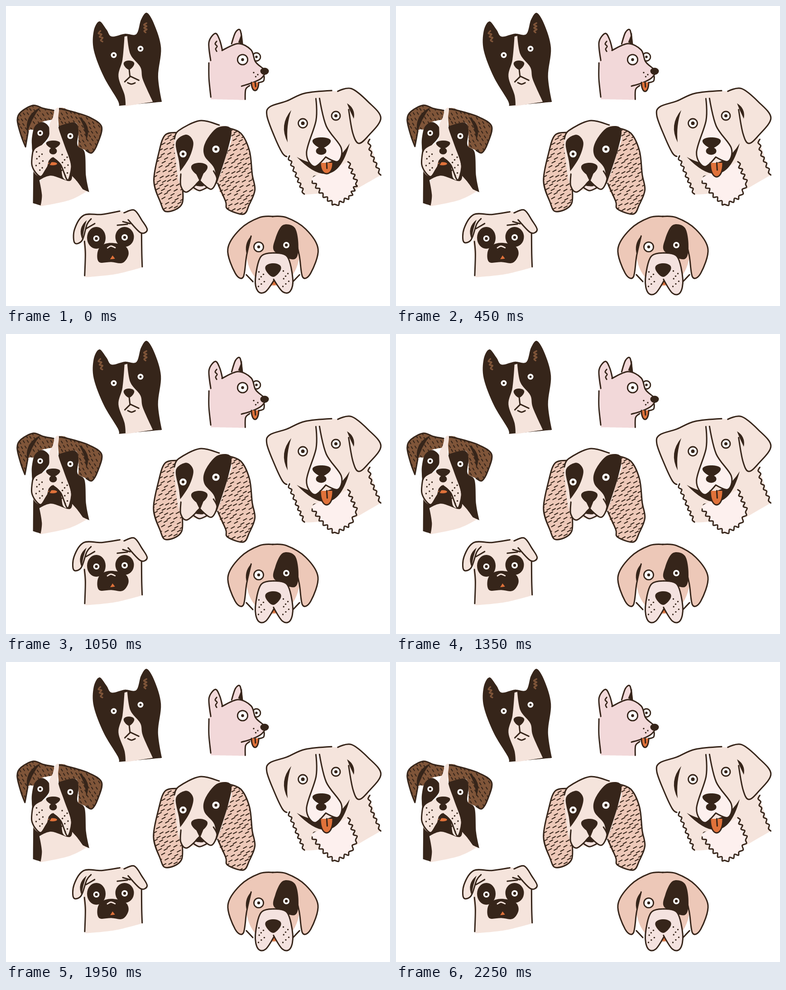
Animation, 848 px wide and 660 px high, one loop 2400 ms. Source, as an HTML page with a canvas:

```html
<!DOCTYPE html>
<html lang="en">
<head>
<meta charset="utf-8">
<title>Dogs</title>
<style>
html, body { margin: 0; width: 100%; height: 100%; overflow: hidden; background: #fff; }
canvas { display: block; width: 848px; height: 660px; }
</style>
</head>
<body>
<canvas id="stage"></canvas>
<script>
const INK = "#36251a", PALE = "#f5e4dc", PINK = "#f2d8d9", PEACH = "#edc8b8",
      BROWN = "#7f5539", ORANGE = "#e0723a", MUZZLE = "#f4e2df", CHEST = "#fdf0ee";
const STEP = 150, ORDER = [0, 1, 2, 1];

const canvas = document.getElementById("stage");
const ctx = canvas.getContext("2d");
const ratio = window.devicePixelRatio || 1;
canvas.width = 848 * ratio;
canvas.height = 660 * ratio;

let pose = 0;
const lift = () => pose - 1;                 // -1, 0, 1: tongues and jowls
const sway = () => pose > 1 ? 1 : lift() * 0.3; // ears mostly move in the last pose
const wobble = (x, y) => 0.35 * Math.sin(x * 12.9 + y * 78.2 + pose * 37);

// "x,y x,y!" where ! marks a sharp corner.
function points(text) {
  return text.split(" ").map(p => {
    const [x, y] = p.replace("!", "").split(",").map(Number);
    return { x: x + wobble(x, y), y: y + wobble(y, x), k: p.endsWith("!") ? 0 : 1 / 6 };
  });
}

function spline(p, closed) {
  const n = p.length, path = new Path2D();
  const get = i => closed ? p[(i + n) % n] : p[Math.max(0, Math.min(n - 1, i))];
  path.moveTo(p[0].x, p[0].y);
  for (let i = 0; i < (closed ? n : n - 1); i++) {
    const a = get(i - 1), b = get(i), c = get(i + 1), d = get(i + 2);
    path.bezierCurveTo(b.x + (c.x - a.x) * b.k, b.y + (c.y - a.y) * b.k,
                       c.x - (d.x - b.x) * c.k, c.y - (d.y - b.y) * c.k, c.x, c.y);
  }
  return path;
}

function stroke(path, width = 3) {
  ctx.lineWidth = width;
  ctx.strokeStyle = INK;
  ctx.stroke(path);
}

function paint(color, path) {
  ctx.fillStyle = color;
  ctx.fill(path);
  return path;
}

const lines = (...texts) => texts.forEach(t => stroke(spline(points(t))));
const blob = (color, text) => paint(color, spline(points(text), true));

// A filled shape whose first points carry an ink line.
function form(color, text, inked) {
  const path = blob(color, text);
  stroke(spline(points(text).slice(0, inked)));
  return path;
}

function oval(color, x, y, rx, ry = rx) {
  const path = new Path2D();
  path.ellipse(x, y, rx, ry, 0, 0, 7);
  return paint(color, path);
}

function eye(x, y, r, pupil = 3.2) {
  stroke(oval("#fff", x, y, r), 2.8);
  oval(INK, x, y, pupil);
}

function nose(x, y, w, h) {
  const path = new Path2D();
  for (let t = 0; t < 6.28; t += 0.2)
    path.lineTo(x + w * Math.cos(t) * (1 - 0.4 * Math.sin(t)), y + h * Math.sin(t));
  paint(INK, path);
}

function tongue(x, y, w, h) {
  const path = new Path2D(), low = y + h * 1.33;
  path.moveTo(x - w, y);
  path.bezierCurveTo(x - w, low, x + w, low, x + w, y);
  stroke(paint(ORANGE, path));
  lines(`${x},${y} ${x + 1},${y + h / 2}`);
}

// Tapered crescent from one point to another.
function wedge(x0, y0, x1, y1, bend, w) {
  const len = Math.hypot(x1 - x0, y1 - y0), nx = (y1 - y0) / len, ny = (x0 - x1) / len;
  const path = new Path2D();
  const mid = k => [(x0 + x1) / 2 + nx * k, (y0 + y1) / 2 + ny * k];
  path.moveTo(x0, y0);
  path.quadraticCurveTo(...mid(2 * bend + w), x1, y1);
  path.quadraticCurveTo(...mid(2 * bend - w), x0, y0);
  paint(INK, path);
}

// Fur edge: teeth of the given size along a rough line.
function ragged(text, teeth, size) {
  const p = points(text), out = [];
  for (let i = 0; i < p.length - 1; i++) {
    const dx = p[i + 1].x - p[i].x, dy = p[i + 1].y - p[i].y, len = Math.hypot(dx, dy);
    const n = Math.round(len / teeth) * 2;
    for (let j = 0; j < n; j++) {
      const side = (j % 2 ? -1 : 1) * size;
      out.push({ x: p[i].x + dx * j / n + dy / len * side,
                 y: p[i].y + dy * j / n - dx / len * side, k: 1 / 6 });
    }
  }
  return spline(out.concat(p[p.length - 1]));
}

function freckles(x, y, w, h, n) {
  for (let i = 0; i < n; i++)
    oval(INK, x + w * (i * 2 % 3 - 1) / 2 + Math.sin(i * 5), y + h * (i / (n - 1) - 0.5), 1.7);
}

function hatch(clip, x0, y0, w, h, gap, len, angle) {
  const marks = new Path2D(), dx = Math.cos(angle) * len / 2, dy = Math.sin(angle) * len / 2;
  for (let row = 0; row * 10 < h; row++)
    for (let col = 0; col * gap < w; col++) {
      const x = x0 + (col + row % 2 / 2) * gap + 2 * Math.sin(row * 7 + col);
      const y = y0 + row * 10 + 2 * Math.sin(col * 5 + row);
      marks.moveTo(x - dx, y - dy);
      marks.lineTo(x + dx, y + dy);
    }
  ctx.save();
  ctx.clip(clip);
  stroke(marks, 2.1);
  ctx.restore();
}

function hinge(x, y, degrees, part) {
  ctx.save();
  ctx.translate(x, y);
  ctx.rotate(degrees * sway() * Math.PI / 180);
  ctx.translate(-x, -y);
  part();
  ctx.restore();
}

function bothSides(axis, part) {
  part();
  ctx.save();
  ctx.translate(2 * axis, 0);
  ctx.scale(-1, 1);
  part();
  ctx.restore();
}

function terrier() {
  blob(INK, "249,220! 246,207 216,156 194,98 194,55 206,34 222,52 233,67 262,61 288,62 298,30 311,15 328,41 342,92 336,155 344,211!");
  blob(PALE, "262,67! 268,66! 275,106 297,135 302,162 324,211! 264,220! 262,195 248,155 257,118");
  for (const text of ["206,56 213,78", "307,38 308,58"]) {
    ctx.lineWidth = 3.4;
    ctx.strokeStyle = BROWN;
    ctx.stroke(ragged(text, 8, 3));
  }
  for (const [x, y] of [[238, 108], [297, 94]]) {
    oval("#fff", x, y, 6.5);
    oval(INK, x, y, 2.5);
  }
  nose(271.5, 130, 11, 10);
  lines("271,132 274,155", "262,167 275,155! 293,163", "269,169 277,172 285,169");
}

function pup() {
  eye(553, 112, 9, 2.8);
  form(PINK, "498,83 507,58 517,53 522,84", 4);
  blob(INK, "513,80! 521,58! 522,84!");
  blob(PINK, "449,120! 452,205! 529,207! 529,184 560,163 572,147 554,127 541,96 513,83 479,97");
  form(PINK, "452,120 448,80 462,60 472,75 478,97", 5);
  stroke(ragged("463,78 465,100", 9, 2), 2.8);
  lines("448,125 448,160 452,200", "477,98 512,83 541,96 551,122 567,137", "528,205 529,184 538,175",
        "570,155 569,165 558,169", "520,176 542,170 562,160 571,151");
  eye(522.5, 118, 11.2);
  tongue(550, 168, 8, 20 + 2 * lift());
  oval(INK, 571, 143.5, 9.5, 7.8);
  freckles(552, 151, 10, 9, 3);
}

function boxer() {
  blob(PALE, "75,380! 110,365 145,370! 182,406! 140,427 75,441!");
  blob(INK, "117,264 150,256 161,272 158,306 174,322 177,375 184,410! 170,403! 157,386 146,374! 139,385 100,373 74,383! 79,415 77,439! 60,434! 60,370! 62,345! 100,320 122,295");
  hinge(82, 224, 2.5, () => {
    const ear = form(BROWN, "105,230 82,225 60,218 33,232 25,250 33,285 42,309! 48,275 60,272! 77,256 103,250!", 8);
    hatch(ear, 20, 218, 90, 95, 10, 5, 1 + 0.2 * sway());
  });
  blob(INK, "58,286 64,265 80,255 95,266 95,286 80,305 61,322 57,305");
  hinge(160, 240, -1, () => {
    const ear = form(BROWN, "118,226 150,233 185,245 211,265 203,301 190,323 177,318 160,310! 160,270 150,256 117,264!", 7);
    hatch(ear, 117, 226, 100, 98, 10, 5, 1 + 0.2 * sway());
  });
  wedge(76, 223, 47, 280, -8, 9);
  wedge(160, 243, 177, 296, 8, 8);
  blob(PALE, "108,228 117,226 115,262 128,304 144,350 138,381 126,377 120,348 104,335 90,355 75,375 59,358 62,318 93,296 96,262 103,246");
  blob(INK, "94,341! 104,333 119,346! 122,369! 88,368!");
  oval(ORANGE, 103, 347, 10, 3.5);
  lines("61,307 57,350 75,375 88,360 104,334", "104,334 121,350 136,383 145,354 140,330");
  nose(104, 305, 14.5, 9);
  oval(INK, 104, 319, 8.5, 7.5);
  freckles(74, 341, 13, 40, 9);
  freckles(130, 350, 12, 46, 9);
  eye(75.5, 279.5, 7.6, 2.7);
  eye(142, 286, 8, 2.7);
}

function spaniel() {
  const lean = -0.5 + 0.4 * Math.max(0, lift());
  hinge(382, 278, 1, () => {
    const ear = form(PEACH, "382,278 351,284 337,325 326,385 340,430 353,452 388,434 386,370 374,300", 8);
    hatch(ear, 322, 284, 72, 168, 13, 8, lean);
  });
  const ear = form(PEACH, "487,267 518,280 538,319 544,370 550,405 537,437 524,458 489,447 485,430 468,390 486,330 498,289", 10);
  hatch(ear, 468, 276, 86, 182, 13, 8, lean);
  form(PALE, "372,292 381,274 428,252 471,262 497,272 490,315 465,390 425,405 386,395 374,330", 4);
  blob(INK, "375,299 398,283 414,300 405,333 385,364! 382,340");
  blob(INK, "440,300 466,268 497,270 490,315 465,393! 460,357 438,329");
  form(MUZZLE, "414,400 428,406 445,399 428,390!", 3);
  form(PALE, "386,370 386,396 400,409 428,384! 453,403 466,381 458,363 445,351 428,344 405,354", 7);
  blob(INK, "428,382! 418,394 437,396");
  nose(427, 359, 17, 14);
  blob(INK, "419,368! 436,368! 428,387!");
  eye(391, 325.5, 9.2);
  eye(463.5, 315, 9.5);
}

function retriever() {
  blob(PALE, "622,320! 650,392 659,415! 690,413 772,404! 828,372! 801,292! 770,230 733,188! 690,186! 630,240!");
  form(PALE, "719,186! 660,192 620,209 583,222 576,241 592,285 610,323 620,331!", 8);
  form(PALE, "733,188! 763,182 800,211 828,246 801,284 779,302 766,280 757,228!", 8);
  stroke(ragged("624,331 644,380 659,414", 13, 2.5));
  stroke(ragged("801,294 805,322 828,372", 13, 2.5));
  stroke(paint(CHEST, ragged("690,372 675,382 698,414 727,439 760,419 775,390 755,343", 13, 3.2)));
  blob(CHEST, "690,370 675,382 700,390 750,375 754,345!");
  wedge(630, 229, 622, 300, -8, 8);
  wedge(753, 214, 768, 248, 3, 7);
  wedge(642, 332, 759, 302, -41, 24);
  form(CHEST, "684,204! 685,252 664,322 681,353 706,332! 733,342 740,312 707,264 692,203!", 9);
  tongue(708, 345, 14, 31 + 7 * lift());
  nose(697, 301, 19, 12);
  oval(INK, 696, 319, 11.5, 8.5);
  eye(655.5, 258, 10, 4);
  eye(728.5, 241.5, 9.5, 3.6);
}

function pug() {
  blob(PALE, "176,470 215,459 262,454 298,498 299,530 301,575! 240,590 175,597! 174,555 171,515");
  hinge(205, 459, 7, () => {
    form(PALE, "251,453 212,459 172,459 150,490 149,519 166,514 178,480 188,468", 8);
    wedge(178, 470, 167, 513, -5, 7);
  });
  form(PALE, "261,455 283,449 300,472 312,492 297,499 270,470", 6);
  lines("173,518 175,545 174,593", "299,501 300,545 301,574", "177,490 196,479", "246,482 268,480", "258,474 274,479");
  oval(INK, 199.5, 510, 20.5, 24);
  oval(INK, 262, 508, 20.5, 22);
  blob(INK, "202,545 210,528 232,521 262,528 271,546 258,565 232,563 206,564");
  ctx.lineWidth = 2.8;
  ctx.strokeStyle = PALE;
  ctx.stroke(spline(points("224,532 232,528 241,532")));
  blob(ORANGE, "230,557! 235,549! 241,556!");
  eye(199.5, 511.5, 8.2);
  eye(262, 509, 8.4);
}

function mastiff() {
  const low = 630 + 3 * lift();
  oval(PEACH, 589.5, 540, 59, 76);
  bothSides(589.5, () => {
    form(PEACH, "541,506! 531,550 524,596 506,588 490,535 517,491 560,465 591,463!", 8);
    lines("531,591 545,606");
  });
  wedge(542, 505, 532, 548, -3, 7);
  blob(INK, "595,512 611,482 638,488 646,530 636,557 593,540");
  oval(ORANGE, 592, 606, 12, 8);
  bothSides(592, () =>
    form(MUZZLE, `593,543! 563,551 551,600 556,${low} 573,${low + 2} 593,601!`, 6));
  nose(590, 581, 16.5, 15);
  freckles(564, 601, 11, 32, 7);
  freckles(618, 600, 11, 34, 7);
  eye(558, 530, 10.6);
  eye(619, 526, 8.3);
}

function draw() {
  ctx.setTransform(ratio, 0, 0, ratio, 0, 0);
  ctx.fillStyle = "#fff";
  ctx.fillRect(0, 0, 848, 660);
  ctx.lineCap = ctx.lineJoin = "round";
  [terrier, pup, boxer, spaniel, retriever, pug, mastiff].forEach(dog => dog());
}

let shown = -1;
function tick() {
  pose = ORDER[Math.floor(performance.now() / STEP) % ORDER.length];
  if (pose !== shown) {
    draw();
    shown = pose;
  }
  requestAnimationFrame(tick);
}
tick();
</script>
</body>
</html>
```
